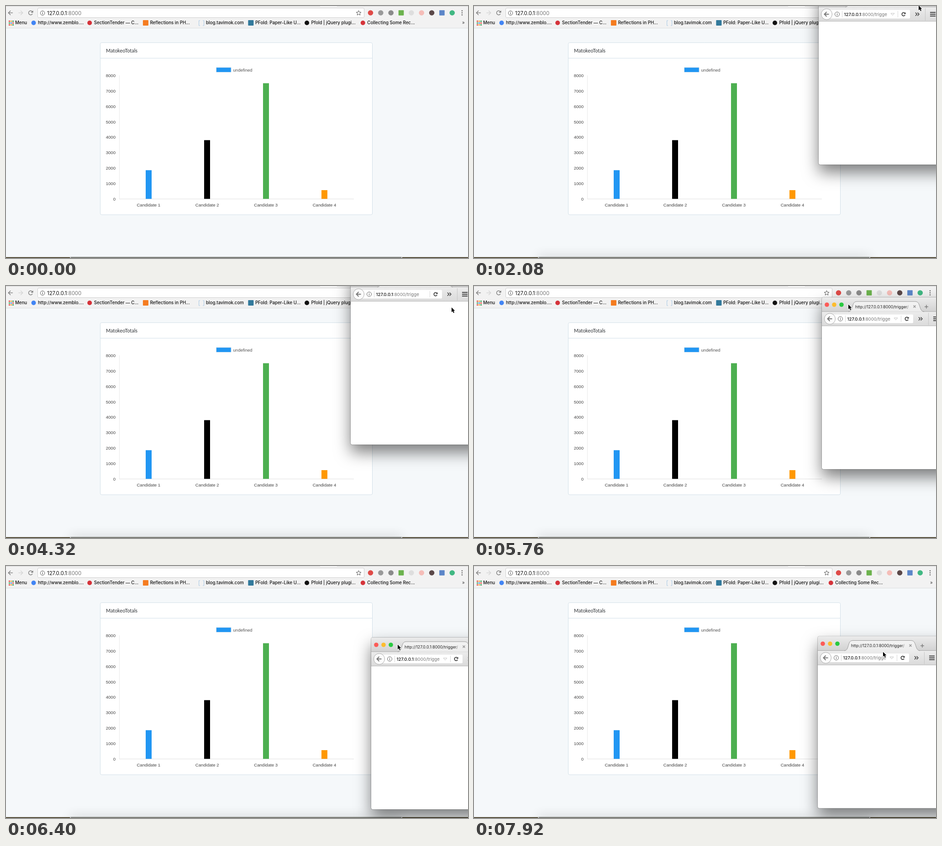
Animation, 1012 px wide and 553 px high, one loop 8000 ms. Source, as an HTML page with a canvas:

```html
<!DOCTYPE html>
<html lang="en">
<head>
<meta charset="utf-8">
<title>Vote tally</title>
<style>
html, body { margin: 0; width: 100%; height: 100%; overflow: hidden; background: #f5f8fa; }
canvas { display: block; width: 1012px; height: 553px; }
</style>
</head>
<body>
<canvas id="stage" width="1012" height="553"></canvas>
<script>
const ctx = document.getElementById('stage').getContext('2d');
const W = 1012, H = 553, LOOP = 8000, STEP = 80;
const UI = 'Inter, "Open Sans", sans-serif';
const CHART = '"Liberation Sans", Arial, sans-serif';
const OPEN_AT = 1760, GRAB_AT = 5520, RELEASE_AT = 7760;
const GRIP = [58, 15.5];
const BAR_BOTTOM = 63; // height of the small window's tab strip and toolbar

const lerp = (a, b, k) => a + (b - a) * Math.min(1, Math.max(0, k));

// Key points are [time, x, y]
const dragKeys = [
  [GRAB_AT, 755, -29], [5760, 762, 25], [6400, 800, 157], [7030, 796, 158], [7520, 753, 154.5]
];
const pointerKeys = [
  [400, 548, 2], [560, 690, 371], [960, 702, 533], [1360, 655, 552], [1680, 660, 551],
  [2080, 974, -1], [2480, 977, 88], [2640, 998, -13], [3440, 1003, -9],
  [3900, 985, 88], [4160, 976, 47], [4320, 976, 47], [4480, 900, -14], [4800, 813, -13]
];

function along(keys, t) {
  const i = Math.max(1, keys.findIndex(key => key[0] > t));
  const end = t >= keys.at(-1)[0];
  const [t0, x0, y0] = end ? keys.at(-2) : keys[i - 1];
  const [t1, x1, y1] = end ? keys.at(-1) : keys[i];
  const k = (t - t0) / (t1 - t0);
  return [lerp(x0, x1, k), lerp(y0, y1, k)];
}

function pointerAt(t, win) {
  if (t < GRAB_AT) return along(pointerKeys, t);
  const k = (t - RELEASE_AT) / (7920 - RELEASE_AT);
  return [lerp(win[0] + GRIP[0], 896, k), lerp(win[1] + GRIP[1], 188.5, k)];
}

function rect(x, y, w, h, fill) {
  ctx.fillStyle = fill;
  ctx.fillRect(x, y, w, h);
}
function paint(fill, stroke, width = 1) {
  if (fill) { ctx.fillStyle = fill; ctx.fill(); }
  if (stroke) { ctx.strokeStyle = stroke; ctx.lineWidth = width; ctx.stroke(); }
}
function round(x, y, w, h, r, fill, stroke) {
  ctx.beginPath();
  ctx.roundRect(x, y, w, h, r);
  paint(fill, stroke);
}
function disc(x, y, r, fill, stroke) {
  ctx.beginPath();
  ctx.arc(x, y, r, 0, 7);
  paint(fill, stroke);
}
function line(points, color, width) {
  ctx.beginPath();
  points.forEach(([x, y]) => ctx.lineTo(x, y));
  paint(null, color, width);
}
// y is the middle of the capital letters
function text(str, x, y, size, color, { font = UI, weight = 400, align = 'left' } = {}) {
  ctx.font = `${weight} ${size}px ${font}`;
  ctx.textAlign = align;
  ctx.fillStyle = color;
  ctx.fillText(str, x, y + size * 0.36);
  return ctx.measureText(str).width;
}
function gradient(x0, y0, x1, y1, from, to) {
  const g = ctx.createLinearGradient(x0, y0, x1, y1);
  g.addColorStop(0, from);
  g.addColorStop(1, to);
  return g;
}

function arrow(x, y, dir, size, color, width) {
  line([[x - size * dir, y], [x + size * dir, y]], color, width);
  line([[x, y - size], [x + size * dir, y], [x, y + size]], color, width);
}
function reload(x, y, r, color, width) {
  ctx.beginPath();
  ctx.arc(x, y, r, 0.5, 5.5);
  paint(null, color, width);
  ctx.beginPath();
  ctx.moveTo(x + r + 1, y - r - 0.5);
  ctx.lineTo(x + r + 1, y - 0.5);
  ctx.lineTo(x, y - 0.5);
  paint(color);
}
function info(x, y, r, color) {
  disc(x, y, r, null, color);
  rect(x - 0.6, y - 0.8, 1.2, 3.4, color);
  rect(x - 0.6, y - 2.8, 1.2, 1.2, color);
}
function star(x, y, r) {
  const points = Array.from({ length: 11 }, (_, i) => {
    const a = i * Math.PI / 5 - Math.PI / 2, d = i % 2 ? r * 0.45 : r;
    return [x + d * Math.cos(a), y + d * Math.sin(a)];
  });
  line(points, '#555');
}
function address(x, y, size, rest, weight) {
  const w = text('127.0.0.1', x, y, size, '#111', { weight });
  text(rest, x + w, y, size, '#777');
}
function mark(x, y, r, color, shape) {
  if (shape === 'square') round(x - r, y - r, 2 * r, 2 * r, 1, color);
  else disc(x, y, r, color);
}
function pageIcon(x) {
  for (const side of [-1, 1]) {
    const inner = x + side * 3, outer = x + side * 5.5;
    line([[inner, 32], [outer, 32], [outer, 43], [inner, 43]], '#a9c8e6');
  }
}

function drawBookmarks() {
  const dots = ['#e8453c', '#f3a32f', '#3ba55a', '#4a8af4'];
  for (let i = 0; i < 9; i++) {
    const col = i % 3, row = (i - col) / 3;
    rect(6 + col * 4, 32 + row * 4, 2.8, 2.8, dots[(col + 2 * row) % 4]);
  }
  const style = { weight: 500 };
  text('Menu', 20, 37, 9.7, '#111', style);
  const links = [
    ['http://www.zemblo....', '#4285f4'],
    ['SectionTender — C...', '#d5333a'],
    ['Reflections in PH...', '#f57c1f', 'square'],
    ['blog.tavimok.com'],
    ['PFold: Paper-Like U...', '#32799b', 'square'],
    ['Pfold | jQuery plugi...', '#111'],
    ['Collecting Some Rec...', '#d5333a']
  ];
  let x = 70;
  for (const [label, color, shape] of links) {
    if (color) mark(x - 9.5, 37, shape ? 6 : 5, color, shape);
    else pageIcon(x - 10);
    const w = text(label, x, 37, 9.7, '#111', style);
    x += label.endsWith('...') ? 122.7 : w + 25;
  }
  text('»', 999, 36.5, 10, '#444');
}

function drawToolbar() {
  rect(0, 0, W, 48, '#f2f2f2');
  rect(0, 0, 688, 1, '#d2d2d2');
  rect(725, 0, W - 725, 1, '#d2d2d2');
  rect(0, 48, W, 1, '#dedfe0');
  arrow(10, 15, -1, 4.8, '#777', 1.3);
  arrow(32, 15, 1, 4.8, '#d4d4d4', 1.3);
  reload(54, 15, 4.5, '#777', 1.3);
  round(69.5, 4.5, 715, 21, 2.5, '#fff', '#cfcfcf');
  info(80, 15.5, 4.8, '#555');
  address(90, 15.5, 11.4, ':8000');
  star(772.5, 15.5, 5.6);

  const extensions = ['#df4a47', '#999', '#8a8a8a', '#6cb24d', '#dedede',
    '#f5bdb8', '#5b4848', '#5c86c8', '#41b883'];
  extensions.forEach((color, i) => {
    mark(798.5 + i * 22.35, 15, 5.8, color, i % 4 === 3 && 'square');
  });
  for (let i = -1; i <= 1; i++) disc(999, 15 + i * 4.5, 1.3, '#666');
  drawBookmarks();
}

function drawChart() {
  round(206.5, 80.5, 596, 377.5, 3, '#fff', '#d3e0e9');
  rect(207, 114, 595, 1, '#d3e0e9');
  text('MatokeoTotals', 219, 98, 10.9, '#2b2f33', { font: 'Lato, sans-serif' });
  rect(460, 134.5, 33.5, 11, '#d7e2ea');
  rect(461, 135.3, 31.7, 9.6, '#2196f3');
  const base = 423.2, perVote = 0.03381, style = { font: CHART };
  text('undefined', 497.5, 140.5, 9.6, '#555', style);
  for (let votes = 0; votes <= 8000; votes += 1000) {
    text(String(votes), 240, base - votes * perVote, 9.6, '#444', { ...style, align: 'right' });
  }
  rect(248, 152, 1, 272, '#e8e8e8');
  rect(248, 423, 514, 1, '#e0e0e0');
  const bars = [[1860, '#2196f3'], [3810, '#000'], [7505, '#4caf50'], [565, '#ff9800']];
  bars.forEach(([votes, color], i) => {
    const x = 312.3 + i * 128.4;
    rect(Math.round(x - 6.5), base - votes * perVote, 13, votes * perVote, color);
    text(`Candidate ${i + 1}`, x, 436.7, 9.6, '#444', { ...style, align: 'center' });
  });
}

function drawDock(hasGlow) {
  rect(0, 551, W, 2, '#514a35');
  ctx.save();
  if (hasGlow) {
    ctx.shadowColor = 'rgba(0,0,0,.2)';
    ctx.shadowBlur = 24;
  }
  round(140, 550, 728, 10, [3, 3, 0, 0], '#c3c6c6');
  ctx.restore();
  rect(142, 551, 724, 2, '#777872');
}

function drawTabStrip() {
  round(0, 0, 310, 31, [4, 4, 0, 0], gradient(0, 0, 0, 31, '#ebebeb', '#d2d2d2'));
  rect(0, 30.5, 310, 1, '#aaa');
  ['#fc5b57', '#fdbc2e', '#29c940'].forEach((color, i) => disc(11 + i * 16, 16, 4.8, color));
  ctx.beginPath();
  ctx.moveTo(58, 31.5);
  ctx.bezierCurveTo(70, 31, 64, 9, 76, 9);
  ctx.lineTo(205, 9);
  ctx.bezierCurveTo(217, 9, 212, 31, 224, 31.5);
  paint(gradient(0, 9, 0, 32, '#f3f3f3', '#ececec'), '#999');
  const fade = gradient(184, 0, 194, 0, '#222', 'rgba(34,34,34,0)');
  text('http://127.0.0.1:8000/trigger/', 73, 20.5, 8.8, fade);
  for (const d of [-2.5, 2.5]) line([[203 - d, 17.5], [203 + d, 22.5]], '#999', 1.6);
  line([[225, 20.5], [233, 20.5]], '#777', 1.4);
  line([[229, 16.5], [229, 24.5]], '#777', 1.4);
}

function drawAddressBar(showChevron) {
  rect(0, 31, 310, 32, gradient(0, 31, 0, BAR_BOTTOM, '#ececec', '#dadada'));
  rect(0, BAR_BOTTOM - 1, 310, 1, '#b9b9b9');
  round(20, 37.5, 180, 19, 2, '#fff');
  disc(17.5, 47, 12, '#fbfbfb', '#aaa');
  arrow(17.5, 47, -1, 5, '#777', 2);
  info(40.5, 47, 5, '#666');
  rect(51, 40, 1, 14, '#d6d6d6');
  address(55.5, 47.3, 9.6, ':8000/trigge', 500);
  if (showChevron) line([[158, 45], [166, 45], [162, 49.5], [158, 45]], '#c3c3c3');
  rect(173, 40, 1, 14, '#d6d6d6');
  reload(186, 47, 3.6, '#333', 1.7);
  for (const x of [212, 216.5]) line([[x, 43.5], [x + 3.3, 47], [x, 50.5]], '#444', 1.7);
  rect(233, 34, 1, 27, '#c6c6c6');
  for (let i = 0; i < 3; i++) rect(244, 42 + i * 4, 12, 2, '#444');
}

function drawWindow(x, y, showChevron) {
  ctx.save();
  ctx.translate(x, y);
  ctx.save();
  ctx.shadowColor = 'rgba(0,0,0,.5)';
  ctx.shadowBlur = 34;
  ctx.shadowOffsetY = 17;
  round(0, 0, 310, 377, 4, '#fff');
  ctx.restore();
  round(-0.5, -0.5, 311, 378, 4, null, 'rgba(0,0,0,.2)');
  drawAddressBar(showChevron);
  drawTabStrip();
  ctx.restore();
}

function drawPointer(x, y) {
  const outline = [[0, 0], [0, 10.5], [2.4, 8.3], [4.2, 12.2], [6, 11.4], [4.3, 7.6], [7.4, 7.4]];
  ctx.beginPath();
  outline.forEach(([dx, dy]) => ctx.lineTo(x + dx, y + dy));
  ctx.closePath();
  paint(null, '#fff', 1.6);
  paint('#000');
}

function draw(now) {
  const t = Math.floor((now % LOOP) / STEP) * STEP;
  const win = along(dragKeys, t), pointer = pointerAt(t, win);
  rect(0, 0, W, H, '#f5f8fa');
  drawToolbar();
  drawChart();
  drawDock(t >= 1520);
  if (t >= OPEN_AT) drawWindow(...win, pointer[1] < win[1] + BAR_BOTTOM);
  if (t >= pointerKeys[0][0]) drawPointer(...pointer);
}

const start = performance.now();
function tick() {
  draw(performance.now() - start);
  requestAnimationFrame(tick);
}
tick();
</script>
</body>
</html>
```
